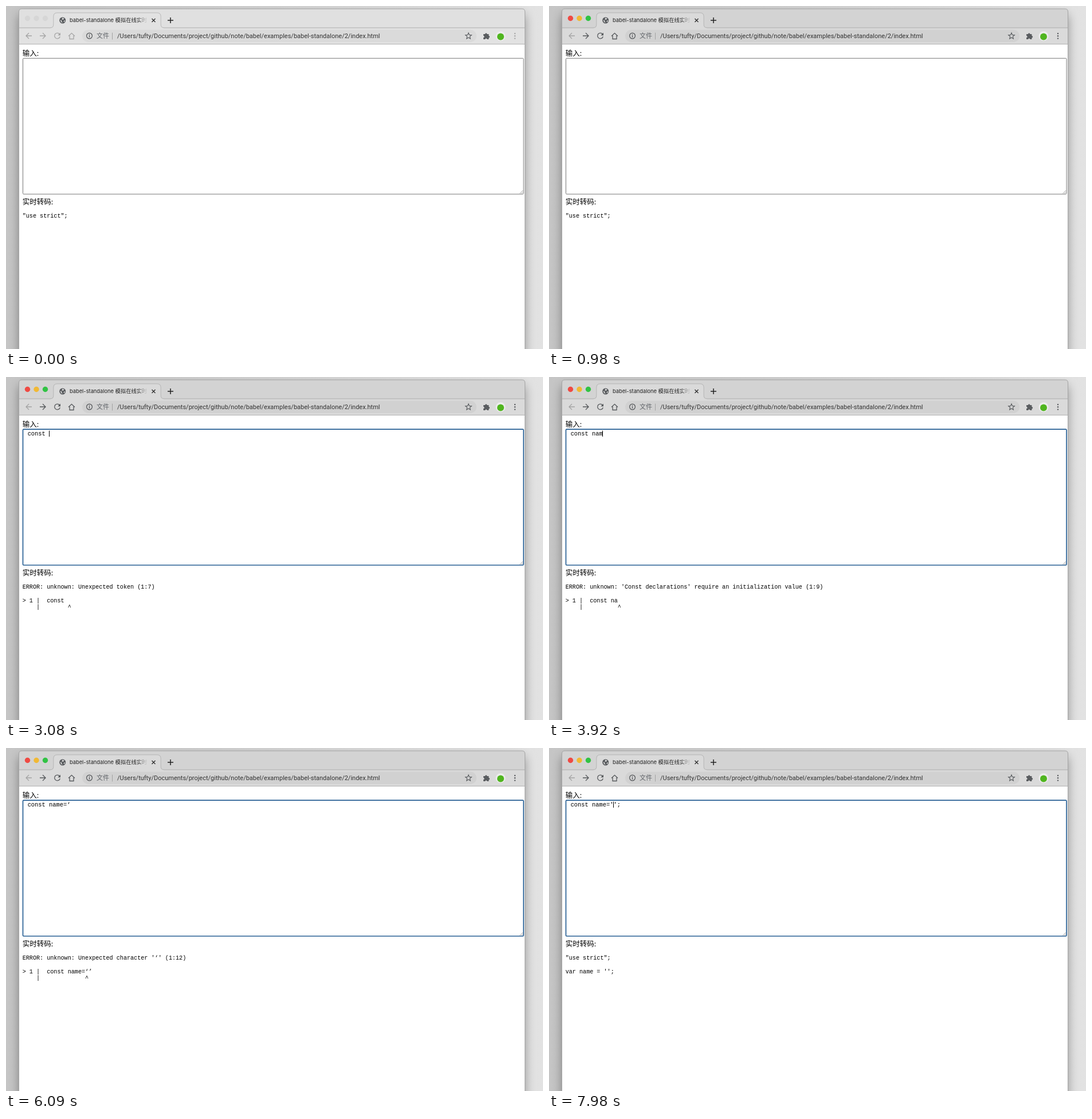
Animation of 937x598 px, one loop 8 s. Source, as an HTML page:

```html
<!DOCTYPE html>
<html lang="zh-CN">
<head>
<meta charset="utf-8">
<title>babel-standalone</title>
<style>
html, body { margin: 0; width: 100%; height: 100%; overflow: hidden; background: #d0d0d0; }
svg {
  display: block; width: 100vw; height: 100vh;
  --strip: #d3d3d3; --bar: #dadada; --field: #d1d1d1; --icon: #55585b;
  --red: #ef4a43; --yellow: #f1b934; --green: #31c344;
}
svg.inactive {
  --strip: #e0e0e0; --bar: #e2e2e2; --field: #dadada; --icon: #a6a6a6;
  --red: #d6d6d6; --yellow: #d6d6d6; --green: #d6d6d6;
}
text { white-space: pre; }
.cjk { font-family: "Noto Sans CJK SC", "Noto Sans CJK", sans-serif; }
.label { font-size: 12.5px; }
.tab-title { font: 9.3px Inter, "Noto Sans CJK SC", "Noto Sans CJK", sans-serif; fill: #222; }
.url { font: 11px Roboto, sans-serif; fill: #333; }
.mono { font-family: "Liberation Mono", monospace; }
.line { fill: none; stroke: var(--icon); stroke-width: 1.3; }
.solid { fill: var(--icon); }
#box { fill: #fff; stroke: #767676; stroke-width: 1; }
.focused #box { stroke: #275f94; stroke-width: 1.7; }
</style>
</head>
<body>
<svg id="stage" viewBox="0 0 937 598" preserveAspectRatio="none">
  <defs>
    <linearGradient id="desk">
      <stop offset="0" stop-color="#c5c5c5"/>
      <stop offset=".5" stop-color="#d2d2d2"/>
      <stop offset="1" stop-color="#e2e2e2"/>
    </linearGradient>
    <linearGradient id="fade" gradientUnits="userSpaceOnUse" x1="228" x2="247">
      <stop offset="0" stop-color="#fff"/>
      <stop offset="1" stop-color="#000"/>
    </linearGradient>
    <mask id="title-mask"><rect x="105" y="14" width="142" height="22" fill="url(#fade)"/></mask>
    <filter id="shadow" x="-10%" y="-10%" width="120%" height="120%"><feGaussianBlur stdDeviation="9"/></filter>
  </defs>

  <rect width="937" height="598" fill="url(#desk)"/>
  <rect x="23" y="16" width="882" height="620" fill="#000" opacity=".38" filter="url(#shadow)"/>

  <!-- window -->
  <path d="M22.5 598V10q0-5 5-5H900.500q5 0 5 5V598" style="fill:var(--strip)" stroke="#a4a4a4"/>
  <path d="M23 38H905V67H23z" style="fill:var(--bar)"/>
  <path d="M23 38H77q6 0 6-6V18q0-6 6-6H264q6 0 6 6V32q0 6 6 6H905" style="fill:none" stroke="#adadad"/>
  <path d="M77 38.500q6.500 0 6.500-6.500V18q0-5.500 5.500-5.500H264q5.500 0 5.500 5.500V32q0 6.500 6.500 6.500z" style="fill:var(--bar)"/>
  <rect x="133" y="41.500" width="688" height="21.500" rx="10.700" style="fill:var(--field)"/>
  <path d="M23 67H905V598H23z" fill="#fff"/>
  <path d="M23 66.500H905" stroke="#b2b2b2"/>

  <circle cx="37.500" cy="21.500" r="4.700" style="fill:var(--red)"/>
  <circle cx="53" cy="21.500" r="4.700" style="fill:var(--yellow)"/>
  <circle cx="68.500" cy="21.500" r="4.700" style="fill:var(--green)"/>

  <!-- tab -->
  <circle cx="98.700" cy="25" r="5.500" fill="#56595c"/>
  <path d="M94.500 24l3 1.500v2l1.500 2-3-1.500zM98 20.500l3.500 1-1 2-3 .5zM101 25.500l2.300-.5-1.300 3-1.500-.5z" fill="#d5d5d5"/>
  <g mask="url(#title-mask)"><text class="tab-title" x="111" y="28">babel-standalone 模拟在线实时转码</text></g>
  <path d="M254.500 22l6 6m0-6l-6 6" stroke="#333" stroke-width="1.400"/>
  <path d="M282 25h10m-5-5v10" stroke="#222" stroke-width="1.500"/>

  <!-- toolbar -->
  <path d="M45 52H35m5-5l-5 5 5 5" fill="none" stroke="#a4a4a4" stroke-width="1.300"/>
  <path class="line" d="M59 52h10m-5-5l5 5-5 5"/>
  <path class="line" d="M93.500 49a4.900 4.900 0 1 0 .8 4.300"/>
  <path class="solid" d="M95 46.500v4.700h-4.700z"/>
  <path class="line" d="M109 52.500l5.500-5.200 5.500 5.200M111 51.500v6h7v-6"/>
  <g fill="none" stroke="#505356" stroke-width="1.200">
    <circle cx="145.500" cy="52" r="4.900"/>
    <path d="M145.500 51.200v3.600m0-5.700v1.300"/>
  </g>
  <text class="cjk" x="158" y="56" font-size="11" fill="#5f6368">文件</text>
  <path d="M185.500 46.500v12" stroke="#a2a2a2"/>
  <text class="url" x="194" y="56">/Users/tufty/Documents/project/github/note/babel/examples/babel-standalone/2/index.html</text>
  <path d="M807 46.800l1.500 3.600 3.900.3-3 2.500.9 3.800-3.300-2-3.300 2 .9-3.800-3-2.500 3.900-.3z" fill="none" stroke="#595c5f" stroke-width="1.100"/>
  <path d="M833 49h3a1.700 1.700 0 1 1 3.400 0h3v3a1.700 1.700 0 1 1 0 3.400v2.600h-3a1.500 1.500 0 0 0-3.200 0h-3.200v-3a1.600 1.600 0 0 0 0-3.200z" fill="#5a5d60"/>
  <circle cx="863" cy="52.500" r="8.500" fill="#ececec"/>
  <circle cx="863" cy="53.500" r="6" fill="#50b51f"/>
  <g class="solid">
    <circle cx="888" cy="48" r="1.200"/><circle cx="888" cy="52.300" r="1.200"/><circle cx="888" cy="56.600" r="1.200"/>
  </g>

  <!-- page -->
  <text class="cjk label" x="28.700" y="86.500">输入:</text>
  <rect id="box" x="29.500" y="91.200" width="873.500" height="236.800" rx="1.500"/>
  <path d="M896.500 327l5.500-5.500m-2.500 5.500l2.500-2.500" stroke="#888" stroke-width=".8"/>
  <text id="input" class="mono" x="31.400" y="102" font-size="10.400"></text>
  <path id="caret" d="M0 93.500v10.500" stroke="#000"/>
  <text class="cjk label" x="28.700" y="345.800">实时转码:</text>
  <g id="output" class="mono" font-size="10.150"></g>
</svg>
<script>
const LOOP = 8000, ACTIVATE = 490, FOCUS = 1190, LAG = 100, BLINK = 500;
const ADVANCE = 6.24;
const $ = id => document.getElementById(id);
const stage = $('stage'), input = $('input'), caret = $('caret'), output = $('output');

// Each edit: time, text, caret column (end of text by default; -1 hides it).
const edits = [[FOCUS, '']];
const edit = (time, text, column = text.length) => edits.push([time, text, column]);
const type = (base, text, times) =>
  times.forEach((time, i) => edit(time, base + text.slice(0, i + 1)));

type('', ' const ', [2100, 2240, 2380, 2450, 2590, 2730, 2940]);
type(' const ', 'name=', [3500, 3640, 3850, 3990, 4550]);
edit(5530, ' const name=‘’', 13);
edit(6030, ' const name=‘', -1);
edit(6200, ' const name=');
type(' const name=', "'';", [6580, 6720, 7140]);
edit(7420, " const name='';", 14);
edit(7600, " const name='';", 13);

const fail = (message, column, source) => [
  `ERROR: unknown: ${message} (1:${column})`, '',
  `> 1 | ${source}`,
  `    | ${' '.repeat(column)}^`
];

function compile(source) {
  const code = source.trim(), strict = '"use strict";';
  if (!code) return [strict];
  if (!code.startsWith('const')) return [strict, '', `${code};`];
  if (code.includes("''")) return [strict, '', "var name = '';"];
  if (code.includes('‘')) return fail("Unexpected character '‘'", 12, source);
  if (code.endsWith("'")) return fail('Unterminated string constant', 12, source);
  if (code === 'const' || code.endsWith('=')) return fail('Unexpected token', source.length, source);
  return fail("'Const declarations' require an initialization value", source.length, source);
}

const editAt = time => edits.findLast(e => e[0] <= time) || [0, '', -1];

let shown;
function showOutput(source) {
  if (source === shown) return;
  shown = source;
  output.replaceChildren(...compile(source).map((line, i) => {
    const text = document.createElementNS('http://www.w3.org/2000/svg', 'text');
    text.setAttribute('x', 28.7);
    text.setAttribute('y', 369.3 + i * 11.7);
    text.textContent = line;
    return text;
  }));
}

function draw() {
  const time = performance.now() % LOOP;
  const [since, text, column = 0] = editAt(time);
  stage.classList.toggle('inactive', time < ACTIVATE);
  stage.classList.toggle('focused', time >= FOCUS);
  input.textContent = text;
  const lit = time >= FOCUS && column >= 0 && (time - since) % (2 * BLINK) < BLINK;
  caret.style.visibility = lit ? 'visible' : 'hidden';
  caret.setAttribute('transform', `translate(${Math.floor(31.4 + column * ADVANCE) + 0.5} 0)`);
  showOutput(editAt(time - LAG)[1]);
  requestAnimationFrame(draw);
}
draw();
</script>
</body>
</html>
```
